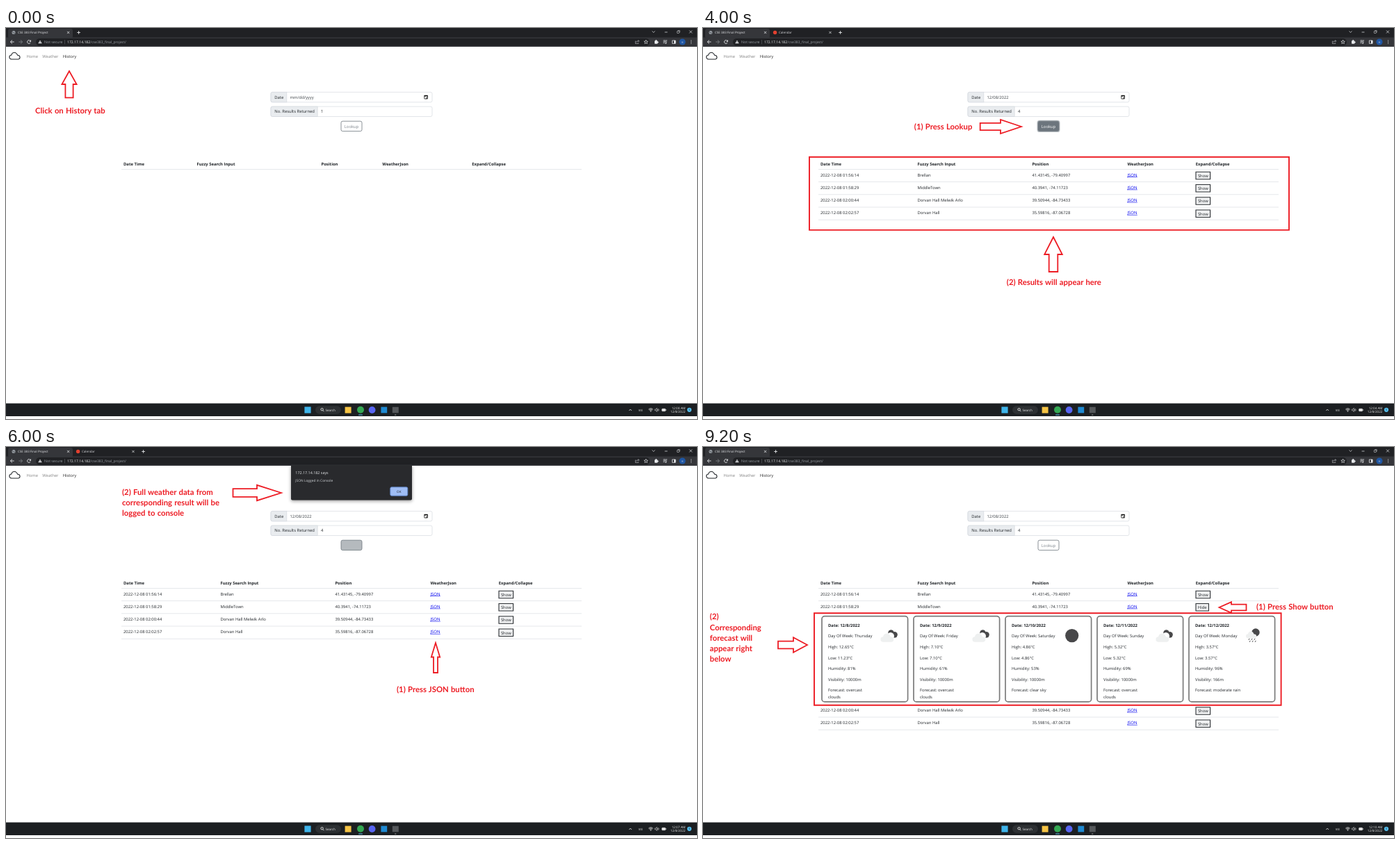
These frames come from a looping animation (994 px wide and 563 px high, 10 s). An HTML page with a canvas:

```html
<!DOCTYPE html>
<html lang="en">
<head>
<meta charset="utf-8">
<title>Weather history walkthrough</title>
<style>
  html, body { margin: 0; width: 100%; height: 100%; overflow: hidden; background: #fff; }
  canvas { display: block; width: 994px; height: 563px; }
</style>
</head>
<body>
<canvas id="stage" width="994" height="563"></canvas>
<script>
const ctx = document.getElementById('stage').getContext('2d');
const LOOP = 10000;
const CUTS = [1000, 2500, 4000, 6000, 8000];
const CLOCK = ['12:00', '12:01', '12:03', '12:04', '12:07', '12:10'];
const SANS = '"Open Sans", "Noto Sans", sans-serif';
const RED = '#ed1c24';
const INK = '#212529';
const BASE = 5.87;

// Text whose capitals are centred on y.
function text(str, x, y, { size = BASE, color = INK, weight = 400, align = 'left', font = SANS } = {}) {
  ctx.font = `${weight} ${size}px ${font}`;
  ctx.fillStyle = color;
  ctx.textAlign = align;
  ctx.fillText(str, x, y + size * 0.357);
}

function note(lines, x, y) {
  ctx.wordSpacing = '0.5px';
  lines.forEach((line, i) => text(line, x, y + i * 15.2,
    { size: 11.3, color: RED, weight: 700, font: 'Lato, sans-serif' }));
  ctx.wordSpacing = '0px';
}

function box(x, y, w, h, { fill, stroke, line = 0.6, r = 0 } = {}) {
  ctx.beginPath();
  ctx.roundRect(x, y, w, h, r);
  paint(fill, stroke, line);
}

function disc(x, y, r, fill, stroke, line) {
  ctx.beginPath();
  ctx.arc(x, y, r, 0, Math.PI * 2);
  paint(fill, stroke, line);
}

function poly(points, { fill, stroke, line = 0.8, close = false } = {}) {
  ctx.beginPath();
  points.forEach(([x, y]) => ctx.lineTo(x, y));
  if (close) ctx.closePath();
  paint(fill, stroke, line);
}

function paint(fill, stroke, line) {
  if (fill) { ctx.fillStyle = fill; ctx.fill(); }
  if (stroke) { ctx.strokeStyle = stroke; ctx.lineWidth = line; ctx.stroke(); }
}

function rule(x1, y1, x2, y2, stroke, line = 0.8) {
  poly([[x1, y1], [x2, y2]], { stroke, line });
}

function shadowed(color, blur, dy, draw) {
  ctx.save();
  ctx.shadowColor = color;
  ctx.shadowBlur = blur;
  ctx.shadowOffsetY = dy;
  draw();
  ctx.restore();
}

// Outlined arrow: tip, direction in quarter turns, length, head length, half widths.
function arrow(x, y, turn, length, head, wide, thin) {
  ctx.save();
  ctx.translate(x, y);
  ctx.rotate(turn * Math.PI / 2);
  poly([[0, 0], [-head, -wide], [-head, -thin], [-length, -thin],
        [-length, thin], [-head, thin], [-head, wide]],
       { stroke: RED, line: 1.8, close: true });
  ctx.restore();
}

function cross(x, y, r, color) {
  rule(x - r, y - r, x + r, y + r, color, 0.8);
  rule(x - r, y + r, x + r, y - r, color, 0.8);
}

function plus(x, y) {
  rule(x - 2.3, y, x + 2.3, y, '#e8eaed', 0.9);
  rule(x, y - 2.3, x, y + 2.3, '#e8eaed', 0.9);
}

function drawTabs(second) {
  box(0, 0, 994, 14, { fill: '#202124' });
  box(3, 1, 93, 14, { fill: '#35363a', r: 3 });
  disc(11, 6.5, 2.5, '#9aa0a6');
  rule(9, 5.8, 11.5, 6.8, '#35363a', 0.7);
  rule(11, 8.2, 13, 6.6, '#35363a', 0.6);
  text('CSE 383 Final Project', 17, 6.6, { size: 4.5, color: '#e8eaed' });
  cross(89.6, 6.5, 1.6, '#e8eaed');
  if (second) {
    disc(103.6, 6.5, 2.7, '#e2402f');
    text('Calendar', 109, 6.6, { size: 4.5, color: '#d5d7da' });
    cross(183, 6.5, 1.6, '#d5d7da');
  }
  plus(second ? 197.6 : 104.6, 6.5);

  const c = '#d0d2d5';
  poly([[929.5, 4.5], [931.5, 6.5], [933.5, 4.5]], { stroke: c });
  rule(947.6, 6, 951.5, 6, c);
  box(965.3, 4.5, 3, 3, { stroke: c, r: 0.5 });
  poly([[966.4, 3.6], [969.2, 3.6], [969.2, 6.5]], { stroke: c, line: 0.6 });
  cross(985, 5.5, 2, c);
}

function drawToolbar() {
  const c = '#e8eaed', dim = '#7d8085';
  box(0, 13.5, 994, 13.5, { fill: '#35363a' });
  box(43, 15, 883, 10.5, { fill: '#202124', r: 5.2 });
  for (const [x, s, col] of [[9, 1, c], [21, -1, dim]]) {
    rule(x - 2.6, 20, x + 2.6, 20, col, 0.9);
    poly([[x, 17.5], [x - 2.6 * s, 20], [x, 22.5]], { stroke: col, line: 0.9 });
  }
  ctx.beginPath();
  ctx.arc(33, 20, 2.4, 0.5, 5.4);
  paint(null, c, 0.9);
  poly([[36, 17], [36, 19.8], [33.3, 19.8]], { fill: c });

  poly([[46.2, 22.3], [49, 17.5], [51.8, 22.3]], { fill: '#d0d2d5' });
  rule(49, 19.2, 49, 20.7, '#202124', 0.6);
  text('Not secure', 55, 20.2, { size: 5.25, color: '#9aa0a6' });
  rule(84.5, 17, 84.5, 23.3, '#5f6368', 0.6);
  text('172.17.14.182', 88, 20.2, { size: 5.1, color: '#f1f3f4' });
  text('/cse383_final_project/', 121.3, 20.2, { size: 5.1, color: '#9aa0a6' });

  const g = '#c4c7cb';
  poly([[906.5, 19], [905.4, 19], [905.4, 22.5], [909.8, 22.5], [909.8, 21.4]], { stroke: g, line: 0.6 });
  poly([[907, 21], [908, 18.8], [910.5, 18.8]], { stroke: g, line: 0.6 });
  poly([[909.3, 17.4], [910.9, 18.8], [909.3, 20.2]], { stroke: g, line: 0.6 });
  const star = Array.from({ length: 10 }, (_, i) => {
    const a = -Math.PI / 2 + i * Math.PI / 5, r = i % 2 ? 1.3 : 2.9;
    return [920.6 + r * Math.cos(a), 20.2 + r * Math.sin(a)];
  });
  poly(star, { stroke: c, line: 0.7, close: true });
  box(933, 18.3, 4.4, 4.4, { fill: c, r: 0.6 });
  disc(935.2, 18, 1, c);
  disc(937.7, 20.5, 1, c);
  for (let i = 0; i < 3; i++) rule(945.5, 18 + i * 1.7, i < 2 ? 949.2 : 947.6, 18 + i * 1.7, c, 0.8);
  poly([[951, 17.8], [949.9, 17.8], [949.9, 21.6]], { stroke: c, line: 0.7 });
  disc(949.2, 21.8, 0.9, c);
  box(958.4, 18, 4.6, 4.3, { stroke: c, line: 0.8 });
  box(961, 18, 2.2, 4.3, { fill: c });
  disc(973, 20, 4.6, '#1f56a3');
  text('H', 973, 20.1, { size: 4, color: '#c7d6ec', align: 'center' });
  for (let i = -1; i < 2; i++) disc(985.6, 20 + i * 2, 0.6, c);
}

function cloudPath(x, y, s) {
  ctx.beginPath();
  ctx.arc(x - 4.5 * s, y + 1.7 * s, 3 * s, Math.PI / 2, Math.PI * 1.5);
  ctx.arc(x - 0.4 * s, y - 0.9 * s, 4.2 * s, Math.PI * 1.1, Math.PI * 1.9);
  ctx.arc(x + 4.7 * s, y + 1.8 * s, 2.9 * s, Math.PI * 1.45, Math.PI / 2);
  ctx.closePath();
}

function drawNav() {
  cloudPath(12.4, 40.3, 1);
  paint(null, INK, 1.1);
  text('Home', 29.5, 40.8, { color: '#858585' });
  text('Weather', 52.3, 40.8, { color: '#858585' });
  text('History', 81.7, 40.8, { color: '#2b2b2b' });
}

function field(y, label, split, value, focus, color) {
  const line = '#ced4da';
  box(381, y, 232, 14.4, { fill: '#fff', stroke: line, r: 2.2 });
  box(381, y, split - 381, 14.4, { fill: '#e9ecef', stroke: line, r: [2.2, 0, 0, 2.2] });
  text(label, 386.3, y + 7.3);
  if (focus) {
    box(split - 0.3, y, 613.3 - split, 14.4, { stroke: '#c5dcff', line: 2.4, r: 1.6 });
    box(split - 0.3, y, 613.3 - split, 14.4, { fill: '#fff', stroke: '#86a9f5', line: 0.8, r: 1.4 });
  }
  text(value, split + 4.7, y + 7.3, { color });
}

function drawForm(scene) {
  field(92.4, 'Date', 403.8, scene < 2 ? 'mm/dd/yyyy' : '12/08/2022', scene === 1, '#3d4247');
  if (scene === 1) {
    box(408, 95.6, 11.6, 8.4, { fill: '#3367d1' });
    text('mm', 408.5, 99.7, { color: '#e5ecfb' });
  }
  box(601.8, 97.2, 4.7, 4.8, { stroke: '#111', line: 0.8, r: 0.4 });
  box(601.6, 97, 5.1, 1.5, { fill: '#111' });
  box(604.3, 99.9, 1.5, 1.5, { fill: '#111' });

  field(113.1, 'No. Results Returned', 448.2, scene < 2 ? '1' : '4', scene === 2, INK);
  if (scene === 2) {
    rule(456.8, 117, 456.8, 124.2, '#111', 0.6);
    box(602.5, 116, 5, 9, { fill: '#efefef' });
    poly([[603.6, 119.5], [605, 117.7], [606.4, 119.5]], { fill: '#444' });
    poly([[603.6, 121.8], [605, 123.6], [606.4, 121.8]], { fill: '#444' });
  }

  const style = { stroke: '#6c757d', line: 0.8, r: 2.3, fill: '#fff' };
  if (scene === 3) {
    box(481.3, 133.6, 31.4, 15.6, { stroke: '#b9bec3', line: 1.6, r: 2.8 });
    style.fill = '#6c757d';
  }
  if (scene === 4) style.fill = '#b5babe';
  box(482, 134.2, 30, 14.4, style);
  if (scene !== 4) {
    text('Lookup', 497, 141.6, { color: scene === 3 ? '#fff' : '#7b838a', align: 'center' });
  }
}

function drawHead(cols) {
  ['Date Time', 'Fuzzy Search Input', 'Position', 'WeatherJson', 'Expand/Collapse']
    .forEach((s, i) => text(s, cols[i], 195.6, { weight: 700, size: 5.9 }));
  rule(166, 203.5, 828, 203.5, '#dcdfe3', 0.7);
}

const WIDE = [169, 274.5, 453.5, 541.3, 670.2];
const FULL = [169, 308.4, 473.4, 610.4, 708.8];
const ROWS = [
  ['2022-12-08 01:56:14', 'Brellan', '41.43145, -79.40997'],
  ['2022-12-08 01:58:29', 'MiddleTown', '40.3941, -74.11723'],
  ['2022-12-08 02:00:44', 'Dorvan Hall Melwik Arlo', '39.50944, -84.73433'],
  ['2022-12-08 02:02:57', 'Dorvan Hall', '35.59816, -87.06728']
];

function drawRows(open) {
  ROWS.forEach((row, i) => {
    const y = 211.6 + i * 18.25 + (open && i > 1 ? 131 : 0);
    row.forEach((s, j) => text(s, FULL[j], y));
    text('JSON', FULL[3], y, { size: 6, color: '#0000ee' });
    rule(FULL[3], y + 3, FULL[3] + 14.4, y + 3, '#0000ee', 0.6);
    const hide = open && i === 1, w = hide ? 18.4 : 20.6;
    box(709, y - 4.4, w, 10.6, { fill: '#eff0f1', stroke: '#2b2f33', line: 1.1 });
    text(hide ? 'Hide' : 'Show', 709 + w / 2, y + 1.1, { align: 'center' });
    rule(166, y + 9.9, 828, y + 9.9, '#dcdfe3', 0.7);
  });
}

function drawPicker() {
  shadowed('rgba(0,0,0,0.28)', 18, 8, () => box(404, 107.6, 84, 108, { fill: '#fff', r: 1.5 }));
  box(404, 107.6, 84, 108, { stroke: '#c4c4c4', line: 0.6, r: 1.5 });
  text('December 2022', 407.8, 115.6, { size: 4.5, weight: 600, color: '#111' });
  poly([[443.6, 114.9], [446.4, 114.9], [445, 116.6]], { fill: '#111' });
  for (const [x, s] of [[465.8, -1], [478.2, 1]]) {
    rule(x, 113.2, x, 119, '#444', 0.8);
    poly([[x - 2.7, 116.1 + s * 0.2], [x, 116.1 + s * 2.9], [x + 2.7, 116.1 + s * 0.2]], { stroke: '#444', line: 0.8 });
  }
  const colX = i => 413.2 + i * 10.87;
  const opt = (color, weight = 400) => ({ size: 4.5, align: 'center', color, weight });
  ['Su', 'Mo', 'Tu', 'We', 'Th', 'Fr', 'Sa'].forEach((d, i) => text(d, colX(i), 130.1, opt('#222')));
  box(451.7, 147, 10.2, 10.2, { fill: '#2f6df0', stroke: '#10264f', line: 1.1, r: 0.6 });
  for (let i = 0; i < 42; i++) {
    const day = new Date(2022, 10, 27 + i);
    const color = day.getMonth() !== 11 ? '#858585' : day.getDate() === 8 ? '#fff' : '#111';
    text(String(day.getDate()), colX(i % 7), 141.3 + Math.floor(i / 7) * 10.83, opt(color));
  }
  text('Clear', 412.2, 207.8, { size: 4.5, color: '#2a66d8' });
  text('Today', 479.3, 207.8, { size: 4.5, color: '#2a66d8', align: 'right' });
}

function drawAlert() {
  shadowed('rgba(0,0,0,0.4)', 5, 1.5, () => box(410, 26.5, 174, 50, { fill: '#292a2d', r: [0, 0, 2, 2] }));
  text('172.17.14.182 says', 416.3, 37, { size: 5.4, color: '#e8eaed' });
  text('JSON Logged in Console', 416.3, 48, { size: 4.85, color: '#d0d3d7' });
  box(552.8, 57.8, 25, 12.4, { fill: '#9fbdf5', stroke: '#5f83c4', line: 1, r: 1.8 });
  text('OK', 565.3, 64.1, { size: 4.6, color: '#202124', align: 'center' });
}

// [date, weekday, high, low, humidity, visibility, forecast]
const DAYS = [
  [8, 'Thursday', '12.65', '11.23', 81, 10000, 'overcast clouds'],
  [9, 'Friday', '7.10', '7.10', 61, 10000, 'overcast clouds'],
  [10, 'Saturday', '4.86', '4.86', 53, 10000, 'clear sky'],
  [11, 'Sunday', '5.32', '5.32', 69, 10000, 'overcast clouds'],
  [12, 'Monday', '3.57', '3.57', 96, 166, 'moderate rain']
];

function paleCloud(x, y, s) {
  cloudPath(x, y, s);
  paint('#eef0f0');
}

function weatherIcon(kind, x, y) {
  const dark = '#48484a';
  if (kind === 'clear sky') return disc(x - 1, y, 9.6, dark);
  if (kind === 'moderate rain') {
    disc(x + 3, y - 4.6, 5.7, dark);
    paleCloud(x - 3.5, y - 1, 1);
    for (let i = 0; i < 6; i++) {
      const dx = x - 7 + (i % 3) * 4 + (i > 2 ? 1.2 : 0), dy = y + 4.2 + (i > 2 ? 3 : 0);
      rule(dx + 1, dy, dx, dy + 2, dark, 1);
    }
    return;
  }
  disc(x + 2.5, y - 4.2, 4.2, dark);
  disc(x + 7.6, y - 1.4, 4.2, dark);
  box(x - 1, y - 3, 12, 5.7, { fill: dark, r: 2.6 });
  disc(x + 1.8, y + 0.6, 5.2, '#fff');
  paleCloud(x - 3.2, y + 3.2, 1.25);
}

function drawForecast() {
  DAYS.forEach(([date, day, high, low, humid, sight, sky], i) => {
    const x = 171 + i * 132;
    box(x, 243.7, 123.6, 123.2, { fill: '#fff', stroke: '#7b7b7b', line: 1.7, r: 4 });
    weatherIcon(sky, x + 97 - (i === 4 ? 4 : 0) + (i === 2 ? -0.3 : 0), 271.6);
    text(`Date: 12/${date}/2022`, x + 9, 256.8, { weight: 700, size: 5.9 });
    const lines = [`Day Of Week: ${day}`, `High: ${high}°C`, `Low: ${low}°C`,
      `Humidity: ${humid}%`, `Visibility: ${sight}m`, `Forecast: ${sky.replace(' clouds', '')}`];
    lines.forEach((s, j) => text(s, x + 9, 272.4 + j * 15.58));
    if (sky.endsWith('clouds')) text('clouds', x + 9, 359.6);
  });
}

function drawTaskbar(scene) {
  const c = '#e6e6e6';
  box(0, 540.6, 994, 18.4, { fill: '#1c1f22' });
  box(429.4, 545.4, 9.2, 9.2, { fill: '#3fb4ea' });
  box(445, 544.3, 37, 11.4, { fill: '#2d3033', r: 5.7 });
  disc(454.6, 549.2, 1.7, null, '#fff', 0.8);
  rule(455.8, 550.5, 457.4, 552.1, '#fff', 0.9);
  text('Search', 459.6, 550.1, { size: 4.5, color: '#f0f0f0' });
  box(487.6, 545.6, 9, 9, { fill: '#f6c445' });
  disc(510, 549.8, 5, '#34a853');
  box(507, 556.4, 6, 1.2, { fill: '#5fc1e8', r: 0.6 });
  disc(526.6, 550, 4.9, '#5865f2');
  box(539.4, 545.6, 8.8, 8.8, { fill: '#1f8ad2' });
  box(555.8, 545.7, 9, 8.6, { fill: '#55585b' });
  box(559, 556.4, 2.4, 1.2, { fill: '#9a9a9a', r: 0.6 });

  poly([[896.3, 551], [898.2, 549], [900.1, 551]], { stroke: c });
  text('VIE', 912.8, 550.1, { size: 4.3, color: c, align: 'center' });
  for (const r of [1.6, 3.1, 4.5]) {
    ctx.beginPath();
    ctx.arc(927.5, 552.3, r, -Math.PI * 0.76, -Math.PI * 0.24);
    paint(null, c, 0.8);
  }
  disc(927.5, 551.9, 0.7, c);
  poly([[933.6, 548.9], [934.7, 548.9], [936.4, 547.4], [936.4, 552.4], [934.7, 550.9], [933.6, 550.9]],
    { stroke: c, line: 0.6, close: true });
  for (const r of [1.3, 2.6]) {
    ctx.beginPath();
    ctx.arc(936.4, 549.9, r, -0.8, 0.8);
    paint(null, c, 0.6);
  }
  box(943.6, 548.3, 5, 3.4, { fill: c, stroke: c, line: 0.6, r: 0.8 });
  rule(949.6, 549.3, 949.6, 550.7, c);
  text(CLOCK[scene] + ' AM', 977.4, 546.9, { size: 4.55, color: c, align: 'right' });
  text('12/8/2022', 977.4, 552.8, { size: 4.55, color: c, align: 'right' });
  disc(983, 549.8, 3.1, '#55bdeb');
  text('5', 983, 549.9, { size: 3.8, color: '#10202a', align: 'center' });
}

const notes = [
  () => {
    arrow(91, 62, -1, 38.4, 19, 10.6, 5.6);
    note(['Click on History tab'], 42, 118.6);
  },
  () => {
    arrow(639, 101, 2, 63, 28.5, 11, 5.6);
    note(['Type in date to search for history'], 714.3, 101);
  },
  () => {
    arrow(634, 120, 2, 57, 28.5, 11, 5.6);
    note(['Type in the maximum', 'number of results returned'], 705.5, 112.4);
  },
  () => {
    box(153, 185.7, 690, 105.2, { stroke: RED, line: 1.9 });
    arrow(458, 142, 0, 59.3, 30, 10, 5.2);
    note(['(1) Press Lookup'], 303.8, 142.2);
    arrow(504, 301, -1, 50, 25, 12.8, 6.3);
    note(['(2) Results will appear here'], 436.8, 366.2);
  },
  () => {
    arrow(396, 66, 0, 69.5, 35, 11.2, 5.8);
    note(['(2) Full weather data from', 'corresponding result will be', 'logged to console'], 167, 64.5);
    arrow(618, 282, -1, 43, 20.5, 6.2, 3);
    note(['(1) Press JSON button'], 562, 349.3);
  },
  () => {
    box(160, 239.2, 671.6, 132.6, { stroke: RED, line: 1.9 });
    arrow(742.5, 231, 2, 39, 17.5, 7.8, 4.3);
    note(['(1) Press Show button'], 796, 230);
    arrow(150, 285, 0, 42, 20, 10.8, 5.4);
    note(['(2)', 'Corresponding', 'forecast will', 'appear right', 'below'], 9.8, 244.4);
  }
];

function draw(scene) {
  ctx.fillStyle = '#fff';
  ctx.fillRect(0, 0, 994, 563);
  ctx.textRendering = 'geometricPrecision';
  drawTabs(scene > 1 && scene < 5);
  drawToolbar();
  drawNav();
  drawForm(scene);
  drawHead(scene < 3 ? WIDE : FULL);
  if (scene > 2) drawRows(scene === 5);
  if (scene === 1) drawPicker();
  if (scene === 4) drawAlert();
  if (scene === 5) drawForecast();
  drawTaskbar(scene);
  notes[scene]();
}

const start = performance.now();
function tick() {
  const t = (performance.now() - start) % LOOP;
  draw(CUTS.filter(cut => t >= cut).length);
  requestAnimationFrame(tick);
}
tick();
</script>
</body>
</html>
```
